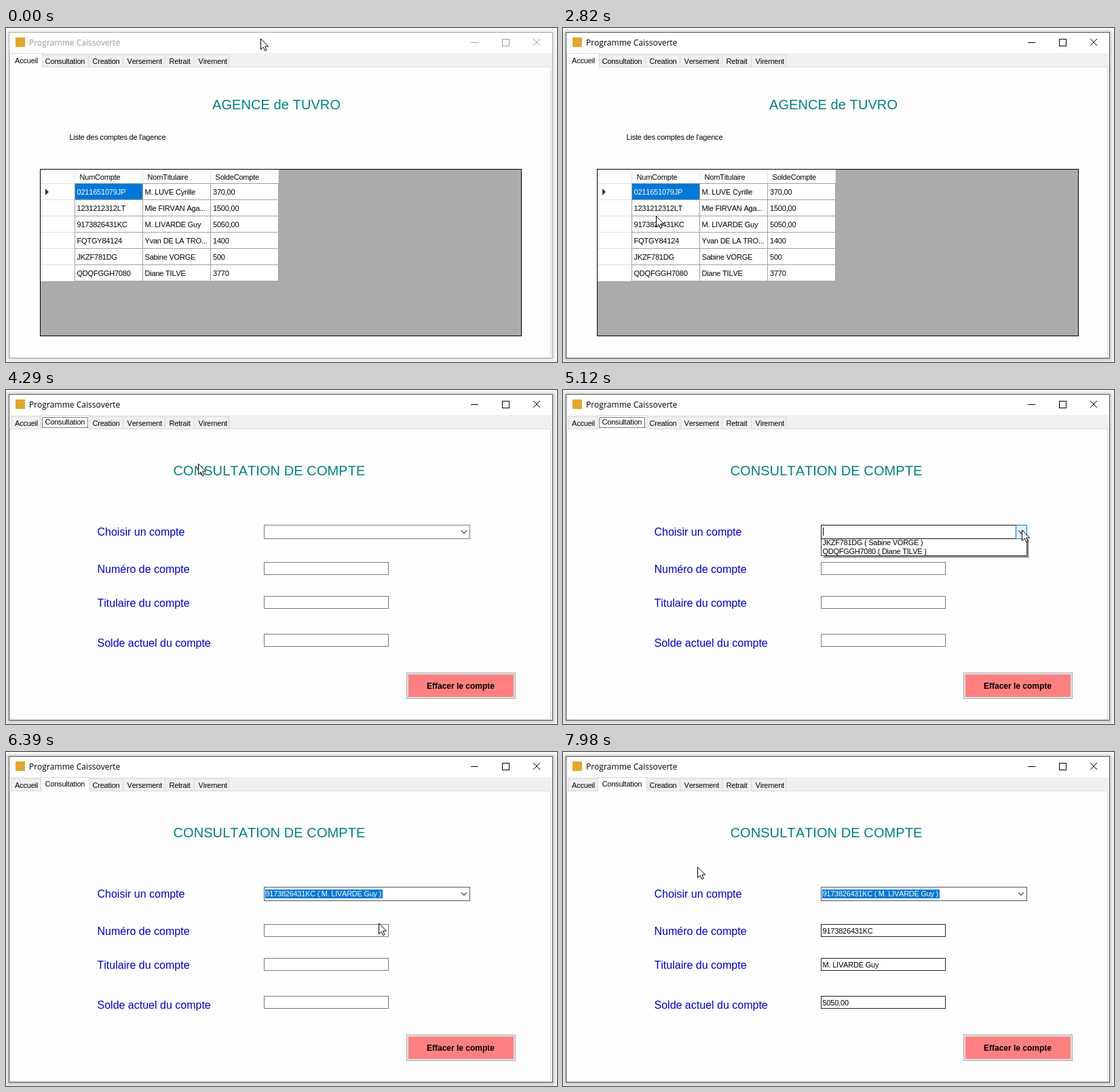
Write an HTML page that moves like this. It is 812 px wide and 493 px high and loops after 8 s.

```html
<!DOCTYPE html>
<html lang="fr">
<head>
<meta charset="utf-8">
<title>Gestion de comptes</title>
<style>
html, body { margin: 0; width: 100%; height: 100%; overflow: hidden; background: #fff; }
svg { display: block; width: 812px; height: 493px; }
text { font-family: "Liberation Sans", Arial, sans-serif; font-size: 11px; letter-spacing: -.2px; font-kerning: none; white-space: pre; }
rect, line { shape-rendering: crispEdges; }
.bar { font-family: "Open Sans", "Noto Sans", sans-serif; font-size: 12px; letter-spacing: 0; }
.head { font-size: 20px; letter-spacing: .08px; fill: #008080; }
.label { font-size: 16px; letter-spacing: 0; fill: #0000c0; }
.list { letter-spacing: -.26px; }
.bold { font-size: 12px; font-weight: bold; letter-spacing: 0; }
</style>
</head>
<body>
<svg id="stage" viewBox="0 0 812 493" width="812" height="493"></svg>
<script>
const LOOP = 8000;
const BLUE = '#0078d7';
const accounts = [
  ['0211651079JP', 'M. LUVE Cyrille', '370,00'],
  ['1231212312LT', 'Mle FIRVAN Agathe', '1500,00', 'Mle FIRVAN Aga...'],
  ['9173826431KC', 'M. LIVARDE Guy', '5050,00'],
  ['FQTGY84124', 'Yvan DE LA TROUNE', '1400', 'Yvan DE LA TRO...'],
  ['JKZF781DG', 'Sabine VORGE', '500'],
  ['QDQFGGH7080', 'Diane TILVE', '3770']
];
const chosen = accounts[2];
const entry = a => `${a[0]} ( ${a[1]} )`;
const fieldTops = [254, 304, 360];
const fieldTouched = [7170, 7290, 7400];

// Markup helpers
const box = (x, y, w, h, fill, attr = '') =>
  `<rect x="${x}" y="${y}" width="${w}" height="${h}" fill="${fill}" ${attr}/>`;
const frame = (x, y, w, h, fill, stroke, attr = '') =>
  box(x + .5, y + .5, w - 1, h - 1, fill, `stroke="${stroke}" ${attr}`);
const text = (x, y, s, cls = '', attr = '') =>
  `<text x="${x}" y="${y}" class="${cls}" ${attr}>${s}</text>`;
const group = (id, body, attr = '') => `<g id="${id}" ${attr}>${body}</g>`;

function windowFrame() {
  let shadow = '';
  for (let i = 1; i <= 7; i++)
    shadow += box(5 - i, 8 - i, 800 + 2 * i, 480 + 2 * i, '#000', `opacity=".03" rx="${i}"`);
  return group('shadow', shadow) +
    frame(4, 6, 802, 482, '#fff', '#555', 'id="border"') +
    box(5, 37, 800, 450, '#f0f0f0') +
    frame(5, 57, 798, 430, '#fefefe', '#dcdcdc') +
    box(14, 14, 14, 14, '#e0a82e') +
    text(34, 26, 'Programme Caissoverte', 'bar', 'id="caption"') +
    group('buttons',
      '<path d="M685 21.5H696M731.5 16.5H741.5V26.5H731.5Z" shape-rendering="crispEdges"/>' +
      '<path d="M777 16L787 26M787 16L777 26"/>', 'fill="none"');
}

function tabs() {
  const names = ['Creation', 'Versement', 'Retrait', 'Virement'];
  const edges = [121, 172, 234, 277, 328];
  const line = '#d9d9d9';
  const rest = names.map((n, i) =>
    frame(edges[i], 39, edges[i + 1] - edges[i] + 1, 19, '#f0f0f0', line) +
    text(edges[i] + 6.5, 53, n)).join('');
  const open = (x, w) => frame(x, 37, w, 21, '#fefefe', line) + box(x + 1, 57, w - 2, 1, '#fefefe');
  return rest +
    group('tabsHome',
      frame(53, 39, 69, 19, '#f0f0f0', line, 'id="hoverTab"') + text(57.5, 53, 'Consultation') +
      open(5, 49) + text(13, 51.5, 'Accueil')) +
    group('tabsView',
      frame(7, 39, 46, 19, '#f0f0f0', line) + text(13, 53, 'Accueil') +
      open(51, 73) + text(57.5, 51, 'Consultation') +
      frame(53, 40, 68, 16, 'none', '#000', 'id="focus" stroke-dasharray="1 1"'));
}

function homePage() {
  let s = text(304, 120, 'AGENCE de TUVRO', 'head') +
    text(93.5, 165, "Liste des comptes de l'agence") +
    frame(50, 208, 710, 247, '#ababab', '#000') +
    box(51, 209, 351, 165, '#fff');
  ['NumCompte', 'NomTitulaire', 'SoldeCompte'].forEach((n, i) => {
    const x = 101 + 100 * i;
    s += text(x + 7.5, 224, n) + box(x, 209, 1, 20, '#e0e0e0') + box(x + 100, 229, 1, 145, '#a0a0a0');
  });
  s += box(401, 209, 1, 20, '#e0e0e0') + box(51, 229, 51, 1, '#e0e0e0') +
    box(101, 229, 301, 1, '#a0a0a0') + box(101, 229, 1, 145, '#a0a0a0') +
    box(102, 230, 99, 23, BLUE) + '<path d="M58 237L63 242L58 247Z" fill="#333"/>';
  accounts.forEach((a, i) => {
    const y = 253 + 24 * i;
    s += box(51, y, 50, 1, '#e0e0e0') + box(101, y, 301, 1, '#a0a0a0') +
      text(104.5, y - 7, a[0], '', i ? '' : 'fill="#fff"') +
      text(204.5, y - 7, a[3] || a[1]) + text(305, y - 7, a[2]);
  });
  return group('home', s);
}

function viewPage() {
  const labels = [['Choisir un compte', 215], ['Numéro de compte', 270],
    ['Titulaire du compte', 320], ['Solde actuel du compte', 379]];
  let s = text(246.5, 126, 'CONSULTATION DE COMPTE', 'head');
  labels.forEach(l => s += text(134.5, l[1], l[0], 'label'));
  fieldTops.forEach((y, i) => s += frame(380, y, 184, 19, '#fff', '#7a7a7a', `id="field${i}"`));
  s += group('values', fieldTops.map((y, i) => text(382.5, y + 14, chosen[i])).join(''));
  s += frame(590, 417, 161, 39, '#e1e1e1', '#adadad', 'id="erase"') +
    box(593, 420, 155, 33, '#ff8080') + text(620, 441, 'Effacer le compte', 'bold');
  s += frame(380, 199, 304, 21, '#fff', '#7a7a7a', 'id="combo"') +
    frame(667, 199, 17, 21, '#e5f1fb', BLUE, 'id="arrowBox"') +
    '<path d="M671 207.500L675 211.500L679 207.500" fill="none" stroke="#444" stroke-width="1.1"/>' +
    box(383, 203, 1, 12, '#000', 'id="caret"') +
    group('picked', box(382, 203, 173, 13, BLUE) + text(382.5, 213, entry(chosen), 'list', 'fill="#fff"'));
  const rows = accounts.map((a, i) => text(382.5, 232 + 13 * i, entry(a), 'list', `id="row${i}"`)).join('');
  s += '<clipPath id="below"><rect x="370" y="220" width="330" height="90"/></clipPath>' +
    '<g clip-path="url(#below)">' + group('drop',
      box(384, 224, 303, 79, '#000', 'opacity=".18"') + box(384, 224, 302, 78, '#000', 'opacity=".35"') +
      frame(380, 220, 304, 80, '#fff', '#444') + box(381, 235, 302, 13, BLUE, 'id="mark"') + rows) + '</g>';
  return group('view', s);
}

const pointer =
  group('arrow', '<path d="M.5 .8V16.600L4.200 13.200L6.700 18.700L9.100 17.600L6.700 12.200H11.600Z" fill="#fff" stroke="#000"/>') +
  group('beam', '<path d="M-3 -7.500H-.5M.5 -7.500H3M-3 7.500H-.5M.5 7.500H3M0 -7V7" stroke="#000" fill="none"/>');

document.getElementById('stage').innerHTML =
  windowFrame() + homePage() + viewPage() + tabs() + group('cursor', pointer);

const el = {};
document.querySelectorAll('[id]').forEach(n => el[n.id] = n);
const show = (id, on) => el[id].setAttribute('display', on ? 'inline' : 'none');
const set = (id, name, value) => el[id].setAttribute(name, value);

// Pointer path: time, x, y
const path = [
  [0, 375, 15], [650, 375, 15], [680, 367, 15], [2150, 367, 15],
  [2400, 170, 95], [2580, 20, 190], [2740, 60, 265], [2900, 190, 278], [3030, 190, 278],
  [3190, 77, 49], [4000, 77, 49], [4400, 380, 135], [4820, 672, 204],
  [4880, 676, 206], [5430, 676, 206], [5720, 558, 246], [5930, 549, 252], [6810, 549, 252],
  [7140, 483, 260], [7300, 470, 315], [7420, 500, 368], [7610, 588, 448], [7640, 588, 448],
  [7980, 198, 169], [LOOP, 198, 169]
];

// Slope at a knot; zero where the pointer rests
function slope(i, k) {
  const a = path[i - 1], b = path[i], c = path[i + 1];
  const same = (p, q) => p[1] === q[1] && p[2] === q[2];
  if (!a || !c || same(a, b) || same(b, c)) return 0;
  return (c[k] - a[k]) / (c[0] - a[0]);
}

function pointerAt(t) {
  let i = 0;
  while (i < path.length - 2 && path[i + 1][0] <= t) i++;
  const a = path[i], b = path[i + 1], d = b[0] - a[0], u = (t - a[0]) / d;
  const v = 1 - u;
  return [1, 2].map(k => Math.round(
    (1 + 2 * u) * v * v * a[k] + u * v * v * d * slope(i, k) +
    u * u * (3 - 2 * u) * b[k] - u * u * v * d * slope(i + 1, k)));
}

const inside = (p, x, y, w, h) => p[0] >= x && p[0] < x + w && p[1] >= y && p[1] < y + h;

function draw(t) {
  const p = pointerAt(t);
  const active = t >= 1900, onView = t >= 3840, chosenYet = t >= 6390;

  set('shadow', 'opacity', active ? 1 : .5);
  set('border', 'stroke', active ? '#555' : '#aaa');
  set('caption', 'fill', active ? '#000' : '#999');
  set('buttons', 'stroke', active ? '#000' : '#999');

  show('tabsHome', t < 3810);
  show('tabsView', t >= 3810);
  show('focus', t < 5240);
  set('hoverTab', 'fill', inside(p, 53, 39, 69, 19) ? '#d8eaf9' : '#f0f0f0');
  show('home', !onView);
  show('view', onView);

  const opened = t >= 5240 && !chosenYet;
  const hot = !chosenYet && (t >= 4850 || inside(p, 380, 199, 304, 21));
  set('combo', 'stroke', opened ? BLUE : hot ? '#111' : chosenYet ? '#565656' : '#7a7a7a');
  show('arrowBox', hot);
  set('arrowBox', 'fill', opened ? '#cce4f7' : '#e5f1fb');
  show('caret', !chosenYet && (t >= 5020 && t < 5550 || t >= 6080));
  show('picked', chosenYet);
  show('values', t >= 6450);

  const slide = Math.min(1, Math.max(0, (t - 5065) / 180));
  show('drop', slide > 0 && !chosenYet);
  set('drop', 'transform', `translate(0 ${Math.round(-80 * (1 - slide))})`);
  const row = opened && p[1] >= 222 ? Math.floor((p[1] - 222) / 13) : -1;
  show('mark', row >= 0);
  set('mark', 'y', 222 + 13 * row);
  accounts.forEach((a, i) => set('row' + i, 'fill', i === row ? '#fff' : '#000'));

  fieldTops.forEach((y, i) => set('field' + i, 'stroke', t >= fieldTouched[i] ? '#222' : '#7a7a7a'));
  set('erase', 'stroke', t >= 7640 && t < 7740 ? BLUE : '#adadad');

  const typing = chosenYet && (fieldTops.some(y => inside(p, 380, y, 184, 19)) || inside(p, 380, 199, 287, 21));
  show('arrow', !typing);
  show('beam', typing);
  set('cursor', 'transform', `translate(${p[0] + (typing ? .5 : 0)} ${p[1]})`);
}

const start = performance.now();
function tick() {
  draw((performance.now() - start) % LOOP);
  requestAnimationFrame(tick);
}
tick();
</script>
</body>
</html>
```
